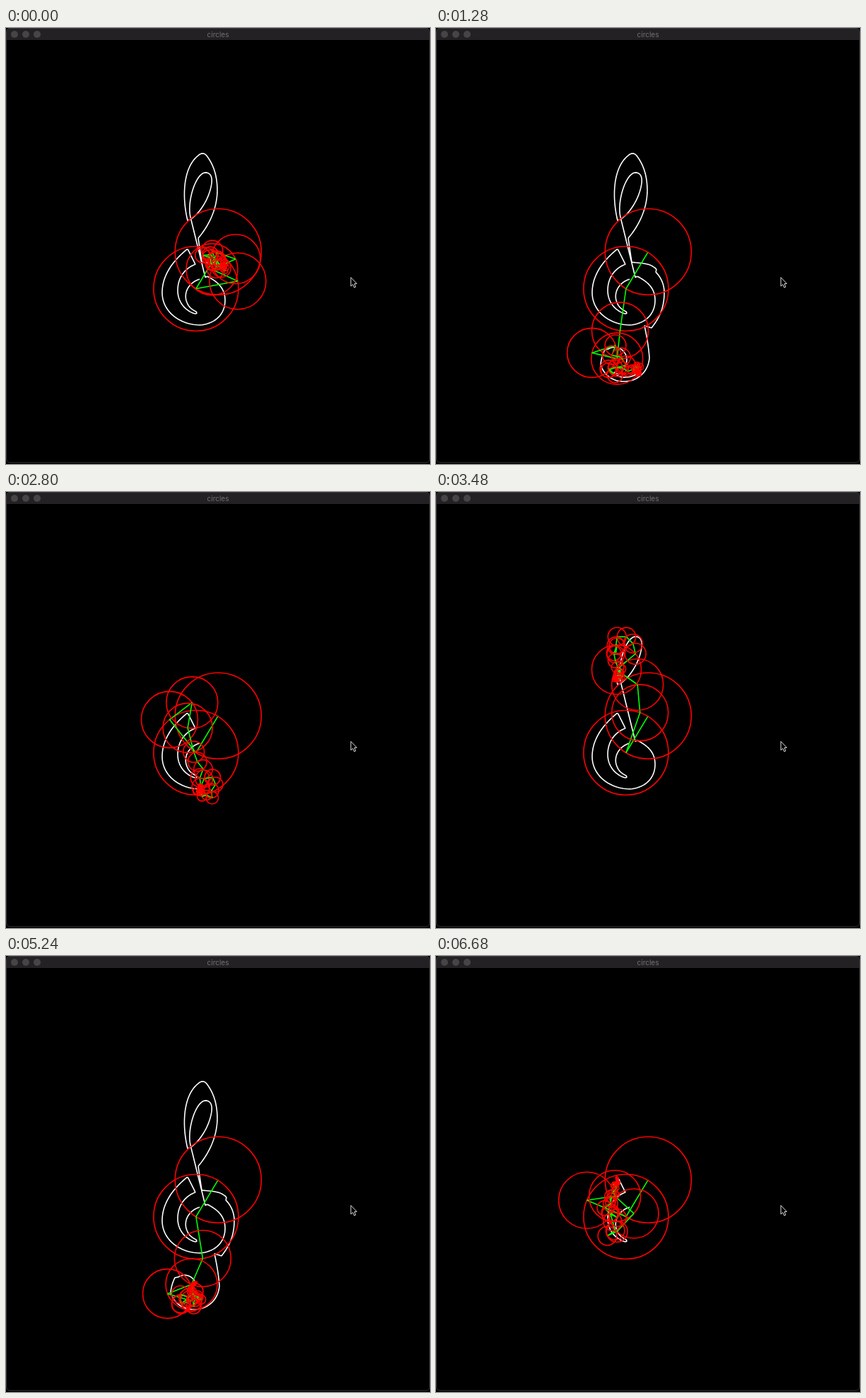
Animation, 600 px wide and 618 px high, one loop 6.72 s. Source, as an HTML page with a canvas:

```html
<!DOCTYPE html>
<html lang="en">
<head>
<meta charset="utf-8">
<title>circles</title>
<style>
  html, body { margin: 0; width: 100%; height: 100%; overflow: hidden; background: #000; }
  canvas, svg { position: absolute; left: 0; top: 0; width: 600px; height: 618px; }
</style>
</head>
<body>
<canvas width="600" height="618"></canvas>
<svg viewBox="0 0 600 618">
  <defs>
    <linearGradient id="glow" x1="0" y1="0" x2="0" y2="1">
      <stop offset="0" stop-color="#300008" stop-opacity="0"/>
      <stop offset=".5" stop-color="#300008"/>
      <stop offset="1" stop-color="#300008" stop-opacity="0"/>
    </linearGradient>
  </defs>
  <rect x="0" y="420" width="1" height="160" fill="url(#glow)"/>
  <path d="M1 17V5Q1 0 6 0H594Q599 0 599 5V17Z" fill="#232124"/>
  <rect x=".5" y=".5" width="599" height="615.5" rx="5" fill="none" stroke="#39373a"/>
  <g fill="#464447">
    <circle cx="12" cy="9" r="5"/><circle cx="28" cy="9" r="5"/><circle cx="44" cy="9" r="5"/>
  </g>
  <text x="300" y="13" text-anchor="middle" font-family="Inter, Roboto, sans-serif" font-size="10" fill="#737174">circles</text>
  <path d="M488 353.5V366L490.8 363.5L492.7 367.8L494.8 367L493 362.6L496.4 362.3Z" fill="#000" stroke="#ddd"/>
</svg>
<script>
const ctx = document.querySelector('canvas').getContext('2d');
const LOOP = 6720, FRAME = 40, HOLD = 240;
const START = 160, N = 720, MAX_K = 75;
const RAD = Math.PI / 180;

// Pieces of the outline: angle swept by the main circle, then the curve.
const pieces = [
  [42.8, 'M274 356C258 361 252 375 255 386C258 396 263 399 269 402Q272 405 267 405C252 400 243 387 243 372C243 353 254 340 268 335L257 313'],
  [28.6, 'M257 313C237 329 221 350 221 375C221 402 246 421 275 421'],
  [24.6, 'M275 421C297 419 310 405 310 386C310 369 300 360 285 352L280 354'],
  [32, 'M261 268C256 246 268 208 281 205C290 204 292 212 291 220C288 243 271 268 257 273'],
  [59.1, 'M257 273C249 240 250 197 273 180Q279 175 284 181C296 197 299 214 299 232C298 258 287 280 272 298L277 332C285 333 295 333 303 336'],
  [25.9, 'M303 336Q308 338 312 342L311 346C318 353 323 363 323 375C323 395 317 410 305 425'],
  [37.4, 'M305 425L295 422C298 436 301 452 302 468C300 488 285 501 266 501C249 501 237 491 233 477'],
  [30.5, 'M233 477Q234 466 239 456L244 455C252 450 262 452 268 462'],
  [31.1, 'M268 462C273 472 268 484 258 491L252 488Q258 496 268 495C279 495 288 489 293 482L295 478C295 460 292 444 288 426'],
  [30.3, 'M288 426C260 430 235 417 221 392C212 377 208 358 209 337'],
  [17.7, 'M209 337C214 318 234 298 255 276']
].map(([span, d]) => {
  const path = document.createElementNS('http://www.w3.org/2000/svg', 'path');
  path.setAttribute('d', d);
  return { span, path, length: path.getTotalLength() };
});

function outlineAt(angle) {
  for (const p of pieces) {
    if (angle < p.span) return p.path.getPointAtLength(p.length * angle / p.span);
    angle -= p.span;
  }
  const last = pieces[pieces.length - 1];
  return last.path.getPointAtLength(last.length);
}
const outline = Array.from({ length: N }, (_, i) => outlineAt(i * 360 / N));

// Leading circles: frequency, radius, phase in degrees.
const center = { x: 300.3, y: 317.2 };
const circles = [[0, 61, 121], [1, 60, 0], [-1, 40, 194.2], [2, 36.5, -3], [-2, 35, 178.6]]
  .map(([k, r, phase]) => ({ k, r, phase: phase * RAD }));

// The rest of the Fourier series, largest first.
const rest = [];
for (let k = -MAX_K; k <= MAX_K; k++) {
  let re = 0, im = 0;
  outline.forEach((p, i) => {
    const a = k * (START + i * 360 / N) * RAD, x = p.x - center.x, y = p.y - center.y;
    re += (x * Math.cos(a) + y * Math.sin(a)) / N;
    im += (y * Math.cos(a) - x * Math.sin(a)) / N;
  });
  const lead = circles.find(c => c.k === k);
  if (lead) {
    re -= lead.r * Math.cos(lead.phase);
    im -= lead.r * Math.sin(lead.phase);
  }
  rest.push({ k, r: Math.hypot(re, im), phase: Math.atan2(im, re) });
}
circles.push(...rest.sort((a, b) => b.r - a.r));

// Time and angle of the main circle; its speed wavers slightly.
const keys = [[0, -10.3], [720, 50.4], [1800, 142.3], [2800, 231.4], [4160, 347.1], [5240, 440.9], [6680, 562.8]];
function angleAt(t) {
  const i = Math.max(1, keys.findIndex(k => k[0] >= t));
  const [t0, a0] = keys[i - 1], [t1, a1] = keys[i];
  return a0 + (a1 - a0) * (t - t0) / (t1 - t0);
}

function draw(angle) {
  ctx.fillStyle = '#000';
  ctx.fillRect(0, 0, 600, 618);
  ctx.lineWidth = 1.6;
  ctx.lineJoin = 'round';

  const count = ((angle - START + 720) % 360) * N / 360;
  ctx.strokeStyle = '#fff';
  ctx.beginPath();
  for (let i = 0; i <= count && i < N; i++) ctx.lineTo(outline[i].x, outline[i].y);
  ctx.stroke();

  let { x, y } = center;
  for (const c of circles) {
    const a = c.k * angle * RAD + c.phase;
    ctx.strokeStyle = '#f00';
    ctx.beginPath();
    ctx.arc(x, y, c.r, 0, 2 * Math.PI);
    ctx.stroke();
    ctx.strokeStyle = '#0f0';
    ctx.beginPath();
    ctx.moveTo(x, y);
    x += c.r * Math.cos(a);
    y += c.r * Math.sin(a);
    ctx.lineTo(x, y);
    if (c.r > 1.5) ctx.stroke();
  }
}

const begin = performance.now();
function tick() {
  const t = Math.floor((performance.now() - begin) % LOOP / FRAME) * FRAME;
  draw(angleAt(t < HOLD ? 0 : t));
  requestAnimationFrame(tick);
}
tick();
</script>
</body>
</html>
```
